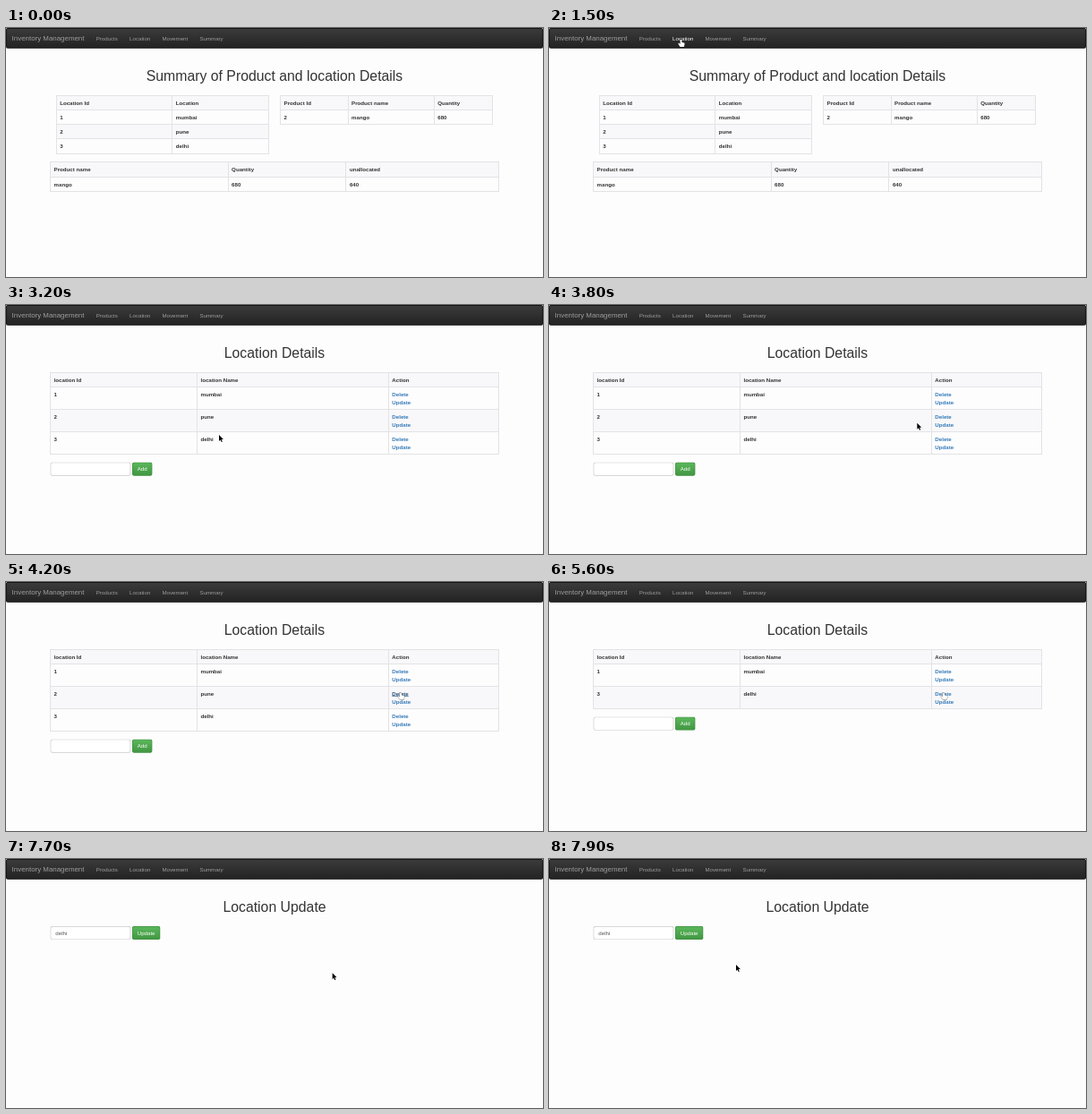
Recreate the animation shown at these times as an HTML page with a canvas. Size 600 by 278 pixels, loop 8 s.

```html
<!DOCTYPE html>
<html lang="en">
<head>
<meta charset="utf-8">
<title>Inventory Management</title>
<style>
  html, body { margin: 0; width: 100%; height: 100%; overflow: hidden; background: #fefdfe; }
  canvas { display: block; }
</style>
</head>
<body>
<canvas id="stage" width="600" height="278"></canvas>
<script>
const ctx = document.getElementById('stage').getContext('2d');

// The web page is laid out 1366 px wide and shown reduced to the stage.
const SCALE = 600 / 1366;
const LOOP = 8000;
const STEP = 100;
const LEFT = 113, TOP = 171, PAGE_WIDTH = 1140;
const LINE = 20, PAD = 9;
const FONT = '"Liberation Sans", Arial, sans-serif';

// time, page, hovered item, pointer shape
const CUES = [
  [0, 'summary'],
  [1200, 'summary', 'Movement', 'hand'],
  [1400, 'summary', 'Location', 'hand'],
  [2200, 'locations', '', 'hand'],
  [2900, 'locations', 'Location', 'hand'],
  [3000, 'locations', '', 'arrow'],
  [4000, 'locations', 'Delete 2', 'hand'],
  [5600, 'remaining', '', 'hand'],
  [6400, 'remaining', 'Delete 3', 'hand'],
  [6800, 'remaining', 'Update 3', 'hand'],
  [7700, 'update', '', 'arrow'],
];

// time, x, y of the pointer tip in stage pixels
const POINTER = [
  [1200, 204, 12.7], [1500, 147.5, 12.7], [2900, 147.5, 12.7],
  [3200, 238, 145], [3300, 238, 145], [3900, 446, 129], [4200, 441, 123],
  [6500, 441, 123], [6900, 442.5, 131.7], [7600, 442.5, 131.7], [7900, 209, 118],
];

const SHAPES = {
  arrow: { path: new Path2D('M0 0V7L1.6 5.6L2.7 8L3.8 7.5L2.7 5.1L4.9 5Z'), fill: '#000', stroke: '#fff' },
  hand: {
    path: new Path2D('M-.9 .9Q0 -.6 .9 .9V3.2L3.4 3.9Q4.2 4.2 4 5.4L3.3 8.3H-1L-3 5.2Q-3.2 4 -2 4.2L-.9 5.2Z'),
    fill: '#fff', stroke: '#333',
  },
};

let hovered = '';

// Draws one line of text centred on y and returns its width.
function text(str, x, y, { size = 14, weight = 'normal', color = '#333', align = 'left' } = {}) {
  ctx.font = `${weight} ${size}px ${FONT}`;
  ctx.fillStyle = color;
  ctx.textAlign = align;
  ctx.fillText(str, x, y + size * 0.3465);
  return ctx.measureText(str).width;
}

function gradient(y, height, from, to) {
  const fill = ctx.createLinearGradient(0, y, 0, y + height);
  fill.addColorStop(0, from);
  fill.addColorStop(1, to);
  return fill;
}

function box(x, y, w, h, border, fill, edge = 1.5) {
  const layer = (inset, style) => {
    ctx.beginPath();
    ctx.roundRect(x + inset, y + inset, w - 2 * inset, h - 2 * inset, 4);
    ctx.fillStyle = style;
    ctx.fill();
  };
  layer(0, border);
  layer(edge, fill);
}

// Thin rules sit on whole stage pixels.
function rule(x1, y1, x2, y2) {
  const [a, b, c, d] = [x1, y1, x2, y2].map(v => Math.floor(v * SCALE));
  ctx.save();
  ctx.setTransform(1, 0, 0, 1, 0, 0);
  ctx.fillStyle = '#e3e2e4';
  ctx.fillRect(a, b, c - a + 1, d - b + 1);
  ctx.restore();
}

function navbar() {
  box(0, 0, 1366, 52, '#080808', gradient(0, 52, '#3c3c3c', '#222'));
  let x = 45 + text('Inventory Management', 15, 26, { size: 18, color: '#9d9d9d' });
  for (const item of ['Products', 'Location', 'Movement', 'Summary']) {
    x += 30 + text(item, x, 26, { color: item === hovered ? '#fff' : '#9d9d9d' });
  }
}

function heading(str) {
  text(str, 683, 121, { size: 36, align: 'center' });
}

function link(label, id, x, y) {
  const active = `${label} ${id}` === hovered;
  const color = active ? '#23527c' : '#337ab7';
  const width = text(label, x, y, { weight: 'bold', color });
  if (active) ctx.fillRect(x, y + 6, width, 1.4);
}

// Draws a striped table and returns the y of its bottom edge.
function table(x, y, widths, rows) {
  const right = x + widths.reduce((sum, w) => sum + w);
  let top = y;
  rows.forEach((cells, i) => {
    const hasLinks = cells.includes('links');
    const height = hasLinks ? 57 : 37;
    if (i % 2 === 0) {
      ctx.fillStyle = '#f8f7f9';
      ctx.fillRect(x, top, right - x, height);
    }
    let left = x;
    cells.forEach((cell, c) => {
      const middle = top + PAD + LINE / 2;
      if (cell === 'links') {
        link('Delete', cells[0], left + PAD, middle);
        link('Update', cells[0], left + PAD, middle + LINE);
      } else {
        text(cell, left + PAD, middle, { weight: 'bold' });
      }
      left += widths[c];
    });
    rule(x, top, right, top);
    top += height;
  });
  rule(x, top, right, top);
  let edge = x;
  for (const w of [0, ...widths]) rule(edge += w, y, edge, top);
  return top + 1;
}

function form(y, value, label) {
  box(LEFT, y, 204, 34, '#ccc', '#fff');
  text(value, LEFT + 13, y + 17, { color: '#555' });
  const x = LEFT + 208;
  ctx.font = `14px ${FONT}`;
  box(x, y, ctx.measureText(label).width + 26, 34, '#3e8f3e', gradient(y, 34, '#5cb85c', '#419641'));
  text(label, x + 13, y + 17, { color: '#fff' });
}

function locationList(rows) {
  heading('Location Details');
  const header = ['location Id', 'location Name', 'Action'];
  const bottom = table(LEFT, TOP, [373, 487, 280], [header, ...rows.map(row => [...row, 'links'])]);
  form(bottom + 20, '', 'Add');
}

const LOCATIONS = [['1', 'mumbai'], ['2', 'pune'], ['3', 'delhi']];

const PAGES = {
  summary() {
    heading('Summary of Product and location Details');
    const bottom = table(128, TOP, [295, 245], [['Location Id', 'Location'], ...LOCATIONS]);
    table(698, TOP, [172, 219, 149], [['Product Id', 'Product name', 'Quantity'], ['2', 'mango', '680']]);
    table(LEFT, bottom + 21, [452, 300, PAGE_WIDTH - 752],
      [['Product name', 'Quantity', 'unallocated'], ['mango', '680', '640']]);
  },
  locations: () => locationList(LOCATIONS),
  remaining: () => locationList(LOCATIONS.filter(([id]) => id !== '2')),
  update() {
    heading('Location Update');
    form(TOP, 'delhi', 'Update');
  },
};

function pointerAt(time) {
  const next = POINTER.findIndex(([t]) => t > time);
  if (next < 0) return POINTER.at(-1).slice(1);
  const [t0, x0, y0] = POINTER[next - 1];
  const [t1, x1, y1] = POINTER[next];
  const k = (time - t0) / (t1 - t0);
  return [x0 + (x1 - x0) * k, y0 + (y1 - y0) * k];
}

function drawPointer(shape, time) {
  const { path, fill, stroke } = SHAPES[shape];
  ctx.setTransform(1, 0, 0, 1, ...pointerAt(time));
  ctx.lineWidth = 0.6;
  ctx.strokeStyle = stroke;
  ctx.fillStyle = fill;
  ctx.stroke(path);
  ctx.fill(path);
}

function draw(now) {
  const time = Math.floor((now % LOOP) / STEP) * STEP;
  const [, page, hover = '', shape] = CUES.findLast(([t]) => t <= time);
  hovered = hover;
  ctx.setTransform(SCALE, 0, 0, SCALE, 0, 0);
  ctx.fillStyle = '#fefdfe';
  ctx.fillRect(0, 0, 1366, 640);
  navbar();
  PAGES[page]();
  if (shape) drawPointer(shape, time);
  requestAnimationFrame(draw);
}

requestAnimationFrame(draw);
</script>
</body>
</html>
```
